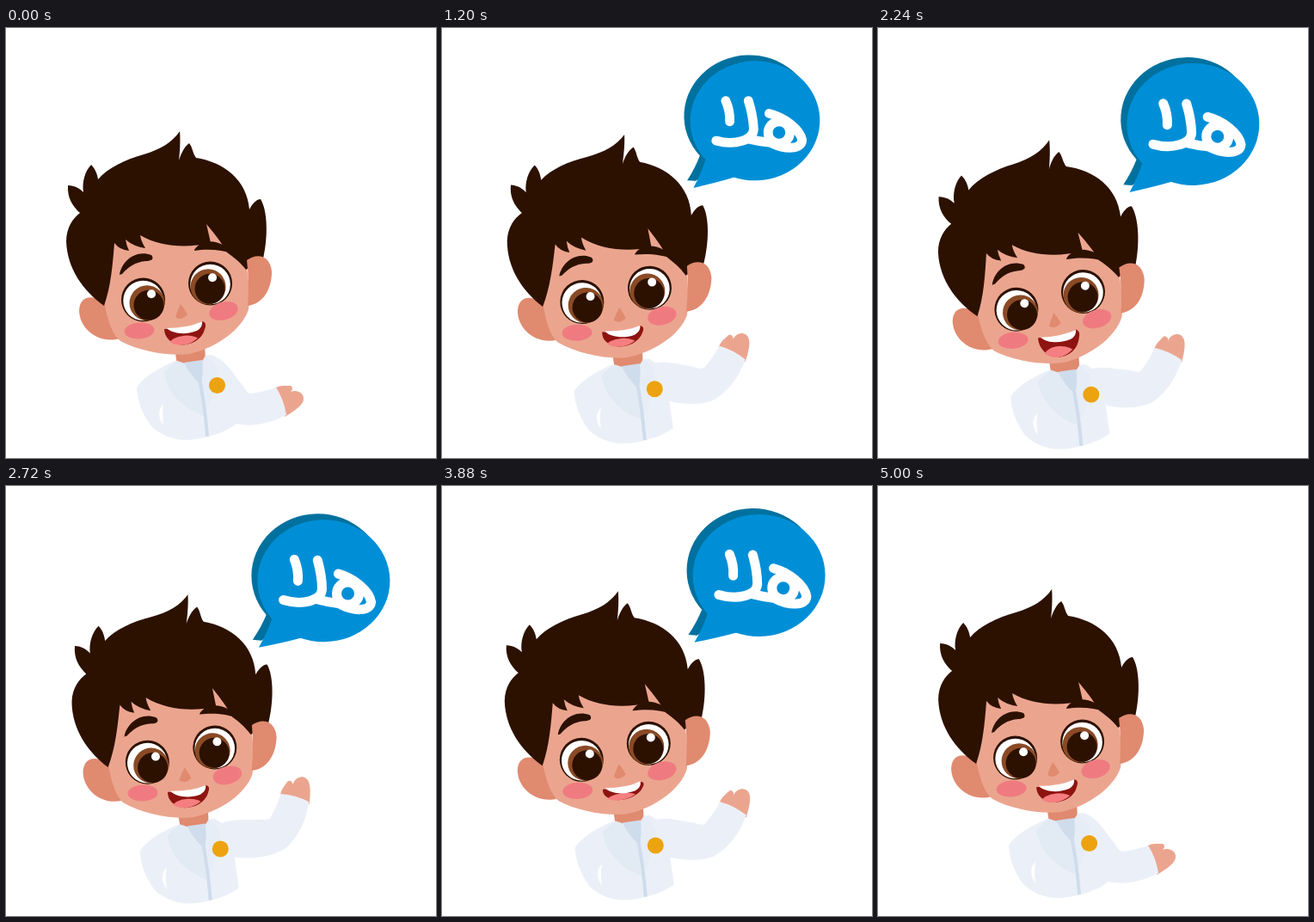
An HTML page for the animation above (5.04 s loop, 500 by 500 pixels).

```html
<!DOCTYPE html>
<html lang="ar">
<head>
<meta charset="utf-8">
<title>Waving boy</title>
<style>
  html, body { margin: 0; width: 100%; height: 100%; overflow: hidden; background: #fff; }
  svg { display: block; width: 100vw; height: 100vh; }
  .skin { fill: #eba58f; }
  .shade { fill: #e08a6f; }
  .hair { fill: #2c1100; }
  .blush { fill: #ef7b81; }
  .cloth { fill: #ebf0f8; }
  .ink { fill: none; stroke: #fff; stroke-width: 11; stroke-linecap: round; stroke-linejoin: round; }
</style>
</head>
<body>
<svg viewBox="0 0 500 500">
  <defs>
    <path id="jaw" d="M184 350Q210 350 228 341Q234 342 231 350C228 362 215 368 204 368C192 367 184 360 184 350Z"/>
    <clipPath id="jawClip"><use href="#jaw"/></clipPath>
  </defs>

  <g id="body">
    <path class="shade" d="M196 372L231 368L232 388Q216 402 199 392Z"/>
    <g id="arm">
      <path class="skin" d="M312 419C318 415 325 416 331 416C334 418 333 421 331 423C338 420 346 424 346 431C346 438 336 445 324 452Z"/>
      <path class="cloth" d="M238 380C255 384 264 403 275 415Q279 424 284 425Q300 423 314 418Q323 432 326 450C305 461 285 464 266 460C248 453 233 436 223 419Z"/>
    </g>
    <path class="cloth" d="M197 387C180 394 160 405 152 418C152 434 160 451 168 462C178 473 195 479 208 479Q222 479 235 475Q253 471 267 461L262 425C261 404 252 386 238 380L232 381L230 387L208 391Z"/>
    <path fill="#fff" d="M183 437C177 443 176 452 183 462Q181 449 183 437Z"/>
    <path fill="#e2eaf4" d="M199 387Q190 393 184 400C187 422 202 440 229 451L222 392L208 390Z"/>
    <path fill="#e6edf6" d="M232 381Q243 388 246 398Q243 428 231 450L225 392Z"/>
    <path fill="#cfdceb" d="M207 389L228 386Q230 401 227 415Q214 404 207 389Z"/>
    <path fill="none" stroke="#cfdceb" stroke-width="4" d="M224 402Q231 438 234 475"/>
    <circle cx="245.5" cy="415.5" r="9.5" fill="#eda30f"/>
  </g>

  <g id="head">
    <path class="shade" d="M118 324C107 310 86 308 85 328C85 350 108 368 132 361Z"/>
    <path class="skin" d="M114 318C118 342 125 358 133 364C155 376 190 382 213 379C245 372 275 350 282 327C284 310 282 290 279 272L270 200L130 220Z"/>
    <path class="hair" d="M114 323C90 306 71 280 70 248C70 232 78 221 86 215C77 207 71 197 72 183C80 183 86 187 90 191C88 179 92 166 99 159C104 164 106 170 107 176C118 163 138 153 160 147C180 141 193 133 202 120C203 132 202 145 201 154C203 147 207 138 213 134C217 139 217 146 221 151C253 156 280 176 283 211C286 205 291 199 296 199C304 212 305 242 299 268L279 281C272 272 264 266 257 261Q250 248 233 228L238 250C210 256 180 255 156 241Q157 248 162 256Q148 254 139 246Q140 253 143 259Q132 258 126 250C124 275 122 300 114 323Z"/>
    <path class="shade" d="M280 270C292 261 307 264 309 283C309 305 298 321 281 323Q283 296 280 270Z"/>
    <path class="hair" d="M132 287C134 272 150 257 169 264C173 269 168 271 163 271C150 272 142 278 135 286Z"/>
    <path class="hair" d="M219 258C228 243 252 246 265 263C250 257 232 257 219 259Z"/>

    <g id="eyes"></g>

    <path class="shade" d="M203 321Q199 329 197 336Q204 341 211 333Q207 326 203 321Z"/>
    <ellipse class="blush" cx="155" cy="352" rx="17.5" ry="9.5" transform="rotate(-4 155 352)"/>
    <ellipse class="blush" cx="253" cy="329" rx="17" ry="10.5" transform="rotate(-15 253 329)"/>

    <g id="mouth">
      <use href="#jaw" fill="#8e1411"/>
      <ellipse cx="208" cy="366" rx="18" ry="8.5" fill="#f57e80" transform="rotate(-5 208 366)" clip-path="url(#jawClip)"/>
    </g>
    <path fill="#fff" d="M187 349Q211 349 228 341Q229 348 222 352C210 357 194 356 187 349Z"/>
  </g>

  <g id="bubble" role="img" aria-label="هلا">
    <g id="back" fill="#00719f">
      <ellipse cx="365" cy="104" rx="77" ry="72"/>
      <path d="M306 147Q299 164 289 178L299 179L330 160Z"/>
    </g>
    <g fill="#008fd7">
      <ellipse cx="372" cy="110" rx="77" ry="71"/>
      <path d="M312 153Q307 168 296 187Q323 182 346 176L360 150Z"/>
    </g>
    <g class="ink" transform="translate(0 2)">
      <path d="M338 83Q343 95 342 108"/>
      <path d="M365 84Q370 102 370 118C369 131 347 137 325 130"/>
      <path d="M362 129Q376 133 392 135"/>
      <path d="M389 100C407 105 425 120 427 133C426 145 406 143 392 136"/>
      <circle cx="400" cy="123" r="13"/>
    </g>
  </g>
</svg>

<script>
const LOOP = 5040, STEP = 40, BEAT = LOOP / 3;
const $ = id => document.getElementById(id);
const place = (id, value) => $(id).setAttribute('transform', value);
const mix = (a, b, u) => a + (b - a) * u;

// Cosine that peaks at the given time.
const wave = (t, peak, period) => Math.cos(2 * Math.PI * (t - peak) / period);

// Smooth step from 0 at time a to 1 at time b.
function ramp(t, a, b) {
  const u = Math.min(1, Math.max(0, (t - a) / (b - a)));
  return u * u * (3 - 2 * u);
}
const hold = (t, a, b, c, d) => ramp(t, a, b) - ramp(t, c, d);

// Quick sink, slow rise; the last of the three beats is weak.
function bob(t) {
  const p = t % BEAT;
  return (t < 2 * BEAT ? 10.8 : 2.5) * hold(p, 0, BEAT / 3, BEAT / 3, BEAT);
}

// Springy entrance, smooth exit.
function pop(t) {
  const u = Math.max(0, t - 508);
  return (1 - Math.exp(-u / 200) * Math.cos(Math.PI * u / 400)) * (1 - ramp(t, 4240, 4640));
}

const dot = (x, y, r, fill) => `<circle cx="${x}" cy="${y}" r="${r}" fill="${fill}"/>`;
const eye = (x, y, look) =>
  dot(x, y, 25.5, '#2c1100') + dot(x, y + 1, 23.3, '#fff') + dot(x + look, y + 3.8, 20.5, '#8a4a25') +
  dot(x + look + 2, y + 6.3, 17.5, '#2c1100') + dot(x + look + 5, y - 6.8, 5, '#fff');
$('eyes').innerHTML = eye(159.5, 316, 4.5) + eye(237.5, 297, -2.5);

function drawBoy(t) {
  const y = bob(t);
  const x = 1.2 * (1 - wave(t, 80, BEAT)) + 1.5 * hold(t, 1900, 2500, 4000, 5000);
  const turn = -2 * wave(t, 320, BEAT) * hold(t, 0, 300, 2400, 3400);
  const lift = hold(t, 500, 840, 4160, 4600) * (50 - 8 * wave(t, 1180, 920));
  const open = 1.07 + 0.17 * wave(t, 500, BEAT) - 0.5 * hold(t, 3400, 3800, 4200, 5000);
  place('body', `translate(${x} ${y})`);
  place('arm', `rotate(${-lift} 249 383)`);
  place('head', `translate(${x + 0.35 * turn} ${y * 0.95}) rotate(${turn} 204 340)`);
  place('mouth', `translate(207 347) rotate(-12) scale(1 ${open}) rotate(12) translate(-207 -347)`);
}

function drawBubble(t) {
  const size = pop(t), shown = size > 0.01;
  $('bubble').style.display = shown ? '' : 'none';
  if (!shown) return;
  const sway = 4 * wave(t, 1800, 1200);
  const x = mix(313, 366 + sway, size);
  const y = mix(160, 106 + 4 * wave(t, 2200, 2 * BEAT), Math.min(1, size));
  place('bubble', `translate(${x} ${y}) rotate(${0.4 * sway - 0.5}) scale(${size}) translate(-369 -108)`);
  // The rear layer trails the front one while the bubble is small.
  const lag = Math.max(0, 1 / size - 1);
  place('back', `translate(${-4 * lag} ${-9 * lag})`);
}

const start = performance.now();
function tick() {
  const now = (performance.now() - start) % LOOP;
  const t = Math.floor(now / STEP) * STEP;
  drawBoy(t);
  drawBubble(t);
  requestAnimationFrame(tick);
}
tick();
</script>
</body>
</html>
```
